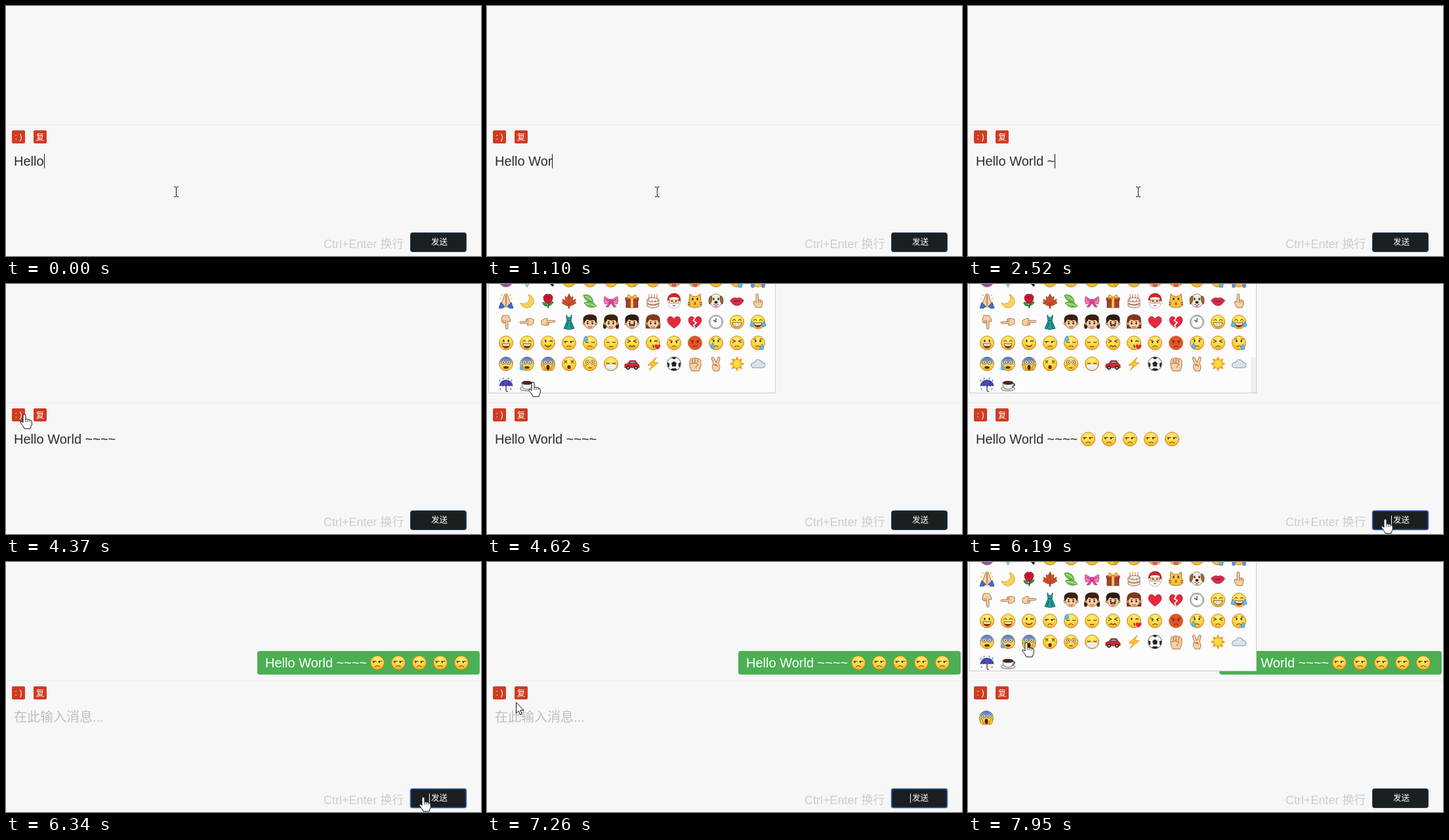
An HTML page that plays this animation: 724 by 382 pixels, repeating every 8000 ms.

```html
<!DOCTYPE html>
<html lang="zh-CN">
<head>
<meta charset="utf-8">
<title>Chat box</title>
<style>
  html, body { margin: 0; width: 100%; height: 100%; overflow: hidden; background: #f7f7f7; }
  svg { display: block; width: 100vw; height: 100vh; }
  text { font: 20px "Liberation Sans", "Noto Sans CJK SC", "Noto Sans CJK", Arial, sans-serif; white-space: pre; }
  .small { font-size: 12.5px; fill: #fff; text-anchor: middle; }
  .emoji { stroke-linecap: round; stroke-linejoin: round; }
</style>
</head>
<body>
<svg viewBox="0 0 724 382">
  <defs>
    <radialGradient id="gold" cx=".5" cy=".3" r=".75">
      <stop offset="0" stop-color="#fff07a"/><stop offset=".6" stop-color="#fed33c"/><stop offset="1" stop-color="#f3a01e"/>
    </radialGradient>
    <linearGradient id="chill" x2="0" y2="1">
      <stop offset="0" stop-color="#2f6fe0"/><stop offset=".3" stop-color="#7ea6dc"/><stop offset=".6" stop-color="#fbd95c"/><stop offset="1" stop-color="#f2a824"/>
    </linearGradient>
    <g id="symbols" class="emoji"></g>
    <g id="hand"><path d="M-2 13V2Q-2 0 0 0T2 2V8Q4 6.5 5 8.3Q7.2 7 8 9Q11.3 8.5 11.3 12V16Q10 18 9 22H0Q-2 17-6 13Q-6.3 10-4 11Z" fill="#fff" stroke="#111"/><path d="M2 8v4M5 8.5V12M8 9.5V12" stroke="#111" stroke-width=".8"/></g>
    <path id="arrow" d="M.5.5V17L4.3 13.5L6.8 19.3L9.3 18.2L6.9 12.5H12Z" fill="#fff" stroke="#111"/>
    <path id="beam" d="M-3-7.5H-1L.5-6.5L2-7.5H4M.5-6.5V6.5M-3 7.5H-1L.5 6.5L2 7.5H4" fill="none" stroke="#111"/>
  </defs>
  <rect width="724" height="382" fill="#f7f7f7"/>
  <path d="M0 181.5H724" stroke="#ececec"/>
  <g id="bubble">
    <rect x="383" y="136" width="339" height="36" rx="4" fill="#4caf54"/>
    <text x="395" y="161" fill="#fff">Hello World ~~~~</text>
    <g id="sent"></g>
  </g>
  <g id="panel">
    <rect x="2.5" y="-10" width="437" height="176.5" fill="#fcfcfc" stroke="#ccc"/>
    <rect id="thumb" x="431" y="112" width="8" height="54" fill="#efefef"/>
    <g id="grid"></g>
  </g>
  <rect x="9" y="190" width="20" height="20" rx="2" fill="#d03b22"/>
  <rect x="42" y="190" width="20" height="20" rx="2" fill="#d03b22"/>
  <text class="small" x="19" y="204">: )</text>
  <text class="small" x="52" y="204.5">复</text>
  <text id="hint" x="12" y="244" fill="#bfbfbf">在此输入消息...</text>
  <text id="draft" x="12" y="244" fill="#2b2b2b"></text>
  <rect id="caret" y="226" width="1" height="22" fill="#111"/>
  <g id="picked"></g>
  <text x="484" y="370" fill="#ccc" style="font-size:18px">Ctrl+Enter 换行</text>
  <rect id="send" x="616.5" y="346.5" width="85" height="29" rx="3" fill="#1a2022"/>
  <text class="small" x="660.5" y="365">发送</text>
  <rect id="tick" x="645" y="354" width="1" height="14" fill="#fff"/>
  <use id="pointer"/>
</svg>
<script>
const $ = id => document.getElementById(id);
const INK = '#5a3208', SKIN = '#f8cfa2', EDGE = '#8f5a30';

// Shape helpers; every emoji is centred on 0,0 with a radius near 11.
const el = (x, y, rx, ry, f, s = 'none') =>
  `<ellipse cx="${x}" cy="${y}" rx="${rx}" ry="${ry}" fill="${f}" stroke="${s}" stroke-width=".8"/>`;
const p = (d, f, s = 'none', w = .8) =>
  `<path d="${d}" fill="${f}" stroke="${s}" stroke-width="${w}"/>`;
const l = (d, s = INK, w = 1.2) => p(d, 'none', s, w);
const pair = (x, y, rx, ry, f, s) => el(-x, y, rx, ry, f, s) + el(x, y, rx, ry, f, s);
const turn = (a, s) => `<g transform="rotate(${a})">${s}</g>`;
const scale = (k, s) => `<g transform="scale(${k})">${s}</g>`;
const face = (s, f = 'url(#gold)') => el(0, 0, 10.6, 10.6, f, '#b9771c') + s;

const dots = pair(3.6, -3, 1.3, 2.1, INK);
const glad = l('M-6.5-2q2.3-3.5 4.6 0M2-2q2.3-3.5 4.6 0');
const shut = l('M-7-1.5q2.5 2 5 0M2-1.5q2.5 2 5 0');
const tight = l('M-7-5l4.5 2.5l-4.5 2M7-5l-4.5 2.5l4.5 2');
const wide = pair(4, -2.5, 2.8, 3, '#fff', INK) + pair(4, -2.5, 1, 1.2, INK);
const cross = l('M-7-5l4 4m0-4l-4 4M3-5l4 4m0-4l-4 4');
const frown = l('M-3.5 6q3.5-3 7 0');
const smile = l('M-5 3q5 5 10 0');
const gape = p('M-6 1Q0 2.5 6 1Q5.5 8 0 8T-6 1Z', '#8a2f18', INK, .6) + p('M-5.4 1.6Q0 3 5.4 1.6L5 4Q0 5-5 4Z', '#fff');
const teeth = p('M-7 1H7Q6 7.5 0 7.5T-7 1Z', '#fff', INK) + l('M-6 4H6M-2.5 2V7M2.5 2V7', '#999', .6);
const mad = l('M-7-4.5l5 2.3M7-4.5l-5 2.3') + pair(4, -1, 1.2, 1.4, INK);
const sad = l('M-7-5l4-2M7-5l-4-2', INK, 1);
const tongue = p('M-3 4H3V8Q0 11-3 8Z', '#f0508a', '#b02a5c');
const drop = (x, y) => p(`M${x} ${y}q6 8 0 8.5q-6-.5 0-8.5Z`, '#5cbcf6', '#2378c4', .6);

// One half-closed eye, looking sideways.
const lid = x => p(`M${x - 3}-2H${x + 3}Q${x + 2} 1 ${x} 1T${x - 3}-2Z`, '#fff6d0')
  + el(x - 1.2, -.9, 1.2, 1.3, INK) + l(`M${x - 3.2}-2.2H${x + 3}`);

const point = p('M-3 0V-9Q-3-11-1.2-11T.6-9V-1Q5-3 6.5 0Q8 5 5 10H-3Q-7 5-7 1Q-5-1-3 2Z', SKIN, EDGE)
  + l('M1-1V3M4-1V3', EDGE, .8);
const heart = 'M0 9.5Q-10 3-10-3Q-9-9-4-8Q-1-7 0-4Q1-7 4-8Q9-9 10-3Q10 3 0 9.5Z';
const bow = 'M0-1L-10-7Q-12 0-9 5L0 1L9 5Q12 0 10-7Z';

const person = (hair, back = '', front = '') => back
  + pair(9, 2, 2, 2.6, SKIN, EDGE) + el(0, 1.5, 8.7, 9, SKIN, EDGE)
  + p('M-9.5 2Q-14-11 0-11.5T9.5 2Q8-1 6-3Q-1-1-5-4Q-7-1-9.5 2Z', hair)
  + l('M-5-.5h3M2-.5h3', hair, 1.1) + pair(3.5, 2.2, 1.2, 1.6, '#2a1a10') + l('M-3 7q3 2 6 0', '#a03a30') + front;

const art = {
  devil: face(smile, '#8d52b4'),
  gem: p('M-9-4L0 11L9-4Z', '#8fd0f4', '#4ca0d8'),
  lens: l('M-2-2L8 9', '#222', 3.5),
  plain: face(dots + smile),
  hush: face(shut + frown),
  flex: face(dots) + p('M2 6Q6 1 9 4L4 11Z', '#f5b52c', '#b8751c'),
  tease: face(glad + tongue),
  yuck: face(tight + tongue),
  sleepy: face(shut + drop(5, 3)),
  fright: face(wide, '#f5c544') + pair(8, 8, 3, 4, '#6c88cf'),

  pray: p('M0-11L2-10L7 4L3 9H-3L-7 4L-2-10Z', SKIN, EDGE) + l('M0-9V7', EDGE)
    + p('M-8 2L-2 8L-5 11H-11ZM8 2L2 8L5 11H11Z', '#3f6fc4', '#28488c') + l('M-5-8l-3-2M5-8l3-2M-7-3l-3-1M7-3l3-1', '#f4b42c'),
  moon: p('M2-10A10.3 10.3 0 1 1-10 3A9 9 0 0 0 2-10Z', '#fbd356', '#cf9024'),
  rose: l('M0 1Q2 6 0 11', '#2a7432', 1.8) + p('M0 8Q-8 8-8 2Q-2 2 0 8ZM1 7Q7 6 8 1Q2 2 1 7Z', '#3a953e', '#1e5a26')
    + p('M-7-6Q-4-12 0-10Q5-12 7-6Q7 2 0 4Q-7 2-7-6Z', '#ce1832', '#7c0c1c') + l('M-4-5q4-4 7 0q-3 4-5 0', '#7c0c1c', 1),
  maple: p('M0-11L3-5L6-7L5 0L10-3L9 1L11 3L4 7H1V11H-1V7H-4L-11 3L-9 1L-10-3L-5 0L-6-7L-3-5Z', '#d2502a', '#94301a')
    + l('M0-8V8M0 6L-7 0M0 6L7 0', '#94301a', .7),
  leaf: p('M-10-9Q2-12 5 1Q-8 2-10-9ZM-9 3Q3-3 10 8Q-2 13-9 3Z', '#74c34c', '#2f7a28') + l('M-8-8Q0-4 4 0M-7 4Q2 4 9 8', '#dcf2b8', .9),
  bow: p('M-2 1L-8 9L-4 9L0 3L4 9H8L2 1Z', '#e0489a', '#a8306c') + p(bow, '#f478b8', '#b03474') + l('M-3 0L-8-3M3 0L8-3', '#b03474') + el(0, 0, 2.6, 2.8, '#e0489a', '#a82a66'),
  gift: p('M-9-2H9V10H-9Z', '#a8402f', '#641c14') + p('M-10-5H10V-1H-10Z', '#c44c3b', '#641c14') + p('M-2-5H2V10H-2Z', '#f3c545')
    + l('M0-5Q-8-13-6-5H6Q8-13 0-5', '#dca030', 2),
  cake: [-6, -2, 2, 6].map(x => l(`M${x}-7V-3`, '#c8607c', 1.4) + el(x, -9, .9, 1.6, '#f29a28')).join('')
    + p('M-9-2V8Q0 13 9 8V-2Z', '#f3e8d6', '#75604c') + el(0, -2, 9, 3, '#fffaf2', '#75604c')
    + l('M-8.5 4Q0 8 8.5 4', '#9c6848', 1.6) + l('M-7-2h1M-2-.5h1M3-.5h1M7-2h.5', '#d0283c', 1.8),
  santa: p('M-10-1Q-9-12 1-11.5Q10-11 10 1L6-2H-6Z', '#d4242a', '#8c1418') + el(0, 2.5, 7.5, 6, SKIN, EDGE)
    + p('M-9 2Q-5 5-3 4Q0 2 3 4Q5 5 9 2Q9 11 0 11T-9 2Z', '#fff', '#aaa') + l('M-7-3Q0-6 7-3', '#fff', 3)
    + el(9, 2, 2, 2, '#fff', '#aaa') + pair(3, 0, 1, 1.3, '#222') + el(0, 2.5, 1.4, 1.1, '#d8786a') + l('M-2 6.5q2 1.5 4 0', '#b02828'),
  cat: p('M-9 0L-8-11L-3-7H3L8-11L9 0Q14 10 0 10T-9 0Z', '#f9c23c', '#8c5c18') + dots + el(0, 2, 1.3, 1, '#c4586a')
    + l('M-2 5q2 1 2-2q0 3 2 2M-7 3l-4-1M-7 5l-4 1M7 3l4-1M7 5l4 1', INK, .8),
  dog: p('M-8-4Q-6-11 0-11T8-4L8 5Q5 10 0 10T-8 5Z', '#f0eae0', '#7c6c5c') + p('M-7-8Q-13-6-10 5Q-6 2-6-5ZM7-8Q13-6 10 5Q6 2 6-5Z', '#99693e', '#5c3c20')
    + dots + el(0, 2, 2.6, 2, '#222') + l('M-4 5Q0 8 4 5', '#555', 1) + el(0, 8, 1.7, 2, '#ef7b8c'),
  lips: p('M-10.5-1Q-4-7 0-4Q4-7 10.5-1Q6 7 0 7T-10.5-1Z', '#d72b4c', '#991a34') + p('M-7-1Q0 1 7-1Q0 3-7-1Z', '#5a0c1c'),
  up: point,

  down: turn(180, point),
  left: turn(-90, `<g transform="scale(.8 1)">${point}</g>`),
  right: turn(90, `<g transform="scale(.8 1)">${point}</g>`),
  dress: p('M-4-11V-7L-3-2L-8 10Q0 13 8 10L3-2L4-7V-11L2-7H-2Z', '#219b97', '#0c5653') + l('M-3-2H3M-2 1L-4 9M2 1L4 9', '#0c5653', 1),
  boy: person('#3a2010'),
  girl: person('#3a2010', pair(9.5, 6, 2.6, 4.5, '#3a2010')),
  man: person('#2c1a12', '', l('M-4 5.3Q0 3.8 4 5.3', '#2c1a12', 2)),
  woman: person('#7d3820', p('M-11 10Q-13-12 0-11.5T11 10Z', '#7d3820')),
  heart: p(heart, '#e8283c', '#ab1427'),
  broken: p(heart, '#e8283c', '#ab1427') + l('M0-6L-2.5-2L2 1L-2 5L0 9', '#fff', 1.8),
  clock: el(0, 0, 10.5, 10.5, '#ddd', '#666') + el(0, 0, 8.8, 8.8, '#fff', '#999')
    + l('M0 0V-6M0 0L-4-3', '#222', 1.1) + l('M0 6.5v.5M6.5 0h.5M-6.5 0h-.5', '#777', 1),
  grin: face(glad + teeth),
  joy: face(glad + gape) + drop(-9, -1) + drop(9, -1),

  smiley: face(dots + gape),
  happy: face(glad + gape),
  wink: face(el(-3.6, -3, 1.3, 2.1, INK) + l('M2-2q2.5-2.5 5 0') + smile),
  unamused: face(lid(-4.3) + lid(4.3) + frown),
  sweat: face(shut + frown) + drop(-6.5, -11),
  pensive: face(shut + l('M-3 5.5h6')),
  twisted: face(tight + l('M-5 6l2.5-2l2.5 2l2.5-2l2.5 2')),
  kiss: face(el(-3.6, -3, 1.3, 2.1, INK) + l('M2-2q2.5-2.5 5 0M-1 3q3 .5 1 2q3 .5 0 2'))
    + `<g transform="translate(7 6)">${scale(.42, p(heart, '#e8283c', '#ab1427'))}</g>`,
  angry: face(mad + frown),
  rage: face(mad + frown, '#e6512c'),
  cry: face(dots + sad + frown) + drop(-5, 0),
  strain: face(tight + frown),
  relief: face(dots + sad + frown) + drop(6, 2),

  fearful: face(wide + el(0, 5.5, 3.8, 2, INK), 'url(#chill)'),
  cold: face(wide + el(0, 5.5, 3.8, 2, INK), 'url(#chill)') + drop(-8, 1),
  scream: face(wide + el(0, 5.5, 2.4, 4, '#4a2010'), 'url(#chill)')
    + p('M-10 2Q-8-1-6 3L-4 10Q-9 12-10 2ZM10 2Q8-1 6 3L4 10Q9 12 10 2Z', '#f9c335', '#a8681c'),
  dizzy: face(cross + el(0, 5, 2.6, 3, '#6a2a14')),
  flushed: face(wide + pair(6.8, 2.5, 2, 1.3, '#f08a5c') + l('M-2.5 6h5')),
  mask: face(shut + p('M-9 2Q0-1 9 2L7 7Q0 12-7 7Z', '#fff', '#aaa') + l('M-6 4.5H6M-5 7H5', '#bbb', .7)),
  car: p('M-11 6V1L-6-1L-3-5H5L9 0L11 2V6Z', '#d8282c', '#7c1014') + p('M-4-1L-2-4H4L6-1Z', '#8cacbc', '#333') + pair(6, 6, 2.9, 2.9, '#222') + pair(6, 6, 1.3, 1.3, '#ccc'),
  bolt: p('M5-10L-8 2H-1L-6 10L8-2H1Z', '#fdc62c', '#d8841a'),
  ball: el(0, 0, 10.5, 10.5, '#f6f6f6', '#333') + p('M0-4L4-1L2.5 4H-2.5L-4-1Z', '#222')
    + p('M-4-9L0-7L4-9L0-10.5ZM-10-2L-7-1L-7 4L-9 5ZM10-2L7-1L7 4L9 5ZM-5 9L-3 7H3L5 9L0 10.5Z', '#222'),
  fist: p('M-8-4Q-7-10-4-8Q0-11 3-8Q8-9 9-4V3Q8 7 6 11H-5Q-9 5-8-4Z', SKIN, EDGE) + l('M-4-7V-2M0-8V-2M4-7V-2M-7 0Q0-3 5 1Q2 3 1 6', EDGE, 1),
  peace: p('M-4 0L-7-9Q-5-12-3-9L0-2L3-10Q6-12 6-8L4 0Q8 5 4 11H-3Q-8 4-4 0Z', SKIN, EDGE) + l('M-4 2Q0 0 3 4M0 0V3', EDGE, 1),
  sun: [0, 45, 90, 135].map(a => turn(a, p('M0-11L2.8-5V5L0 11L-2.8 5V-5Z', '#f5a01c', '#dc8210', .5))).join('') + el(0, 0, 6.5, 6.5, '#fed940', '#ee9c20'),
  cloud: p('M-8 6Q-12 4-10 0Q-8-3-5-2Q-3-8 2-6Q6-5 6-2Q11-2 11 2Q11 6 7 6Z', '#dbe1ea', '#6c7688'),

  rain: l('M0-8V8Q0 11 3 10', '#6a4028', 1.5) + p('M-10 2Q-9-7 0-7T10 2Q7 0 5 2Q2 0 0 2Q-2 0-5 2Q-7 0-10 2Z', '#5348bc', '#2a2474')
    + l('M-4-6L-5 1M4-6L5 1', '#2a2474', .7) + l('M-9-8l-1 3M-4-11l-1 3M4-11l-1 3M9-8l-1 3M-8 5l-1 3M8 5l-1 3', '#3f9ae0', 1.5),
  coffee: el(0, 6, 10.5, 3.4, '#e4e4e4', '#555') + l('M7-2Q14-1 6 4', '#555', 1.7) + p('M-8-3H8Q8 7 0 7T-8-3Z', '#f4f4f4', '#555') + el(0, -3, 8, 2.8, '#4a2414', '#555'),
};

const rows = [
  'devil gem lens plain hush plain flex plain tease yuck plain sleepy fright',
  'pray moon rose maple leaf bow gift cake santa cat dog lips up',
  'down left right dress boy girl man woman heart broken clock grin joy',
  'smiley happy wink unamused sweat pensive twisted kiss angry rage cry strain relief',
  'fearful cold scream dizzy flushed mask car bolt ball fist peace sun cloud',
  'rain coffee',
];
const put = (name, x, y) => `<use href="#${name}" x="${x}" y="${y}"/>`;
const run = (n, x, y) => Array.from({ length: n }, (_, i) => put('unamused', x + 32 * i, y)).join('');

$('symbols').innerHTML = Object.entries(art).map(([k, s]) => `<g id="${k}">${s}</g>`).join('');
$('grid').innerHTML = rows.map((r, j) => r.split(' ').map((k, i) => put(k, 29 + 32 * i, 32 * j - 6)).join('')).join('');
$('sent').innerHTML = run(5, 566, 154);

const LOOP = 8000, MESSAGE = 'Hello World ~~~~';
const keys = [150, 700, 970, 1100, 1530, 1680, 2060, 2520, 2650, 2790, 3100];
const picks = [4900, 5050, 5200, 5340, 5470];
const SENT = 6340, PICK = 7950;
const moves = [
  [0, 'beam', 259, 284], [3500, 'beam', 240, 274], [3640, 'beam', 186, 250], [3780, 'beam', 124, 228],
  [3920, 'arrow', 70, 206], [4060, 'hand', 42, 200], [4210, 'hand', 31, 199], [4370, 'hand', 28, 199],
  [4620, 'hand', 70, 150], [4760, 'hand', 108, 101], [4900, 'hand', 114, 95],
  [5620, 'beam', 510, 301], [5770, 'beam', 585, 338], [5920, 'hand', 628, 354], [6050, 'hand', 636, 359],
  [6750, 'hand', 636, 356], [6880, 'hand', 636, 354], [7010, 'hand', 636, 351], [7140, 'hand', 636, 348],
  [7260, 'arrow', 44, 214], [7380, 'hand', 28, 199], [7680, 'hand', 62, 156], [7810, 'hand', 86, 130], [PICK, 'hand', 89, 123],
];

const count = (times, t) => times.filter(k => k <= t).length;
const show = (id, on) => $(id).setAttribute('visibility', on ? 'visible' : 'hidden');
const within = (t, a, b) => t >= a && t < b;
let last = '';

function render(t) {
  $('draft').textContent = t < SENT ? MESSAGE.slice(0, 5 + count(keys, t)) : '';
  show('caret', t < 3920);
  if (t < 3920) $('caret').setAttribute('x', Math.floor(12.45 + $('draft').getComputedTextLength()));

  const picked = t >= PICK ? put('scream', 28, 238) : t < SENT ? run(count(picks, t), 183, 237) : '';
  if (picked !== last) $('picked').innerHTML = last = picked;

  show('panel', within(t, 4490, SENT) || t >= 7530);
  $('thumb').setAttribute('opacity', +within(t, 5620, SENT));
  show('bubble', t >= SENT);
  show('hint', within(t, SENT, PICK));

  const focus = within(t, 6190, 7530);
  $('send').setAttribute('stroke', focus ? '#2f6cc0' : '#1f3f63');
  $('send').setAttribute('stroke-width', focus ? 1.6 : 1);
  show('tick', focus);

  const [, kind, x, y] = moves[count(moves.map(m => m[0]), t) - 1];
  $('pointer').setAttribute('href', '#' + kind);
  $('pointer').setAttribute('x', x);
  $('pointer').setAttribute('y', y);
}

const start = performance.now();
(function tick() {
  render((performance.now() - start) % LOOP);
  requestAnimationFrame(tick);
})();
</script>
</body>
</html>
```
